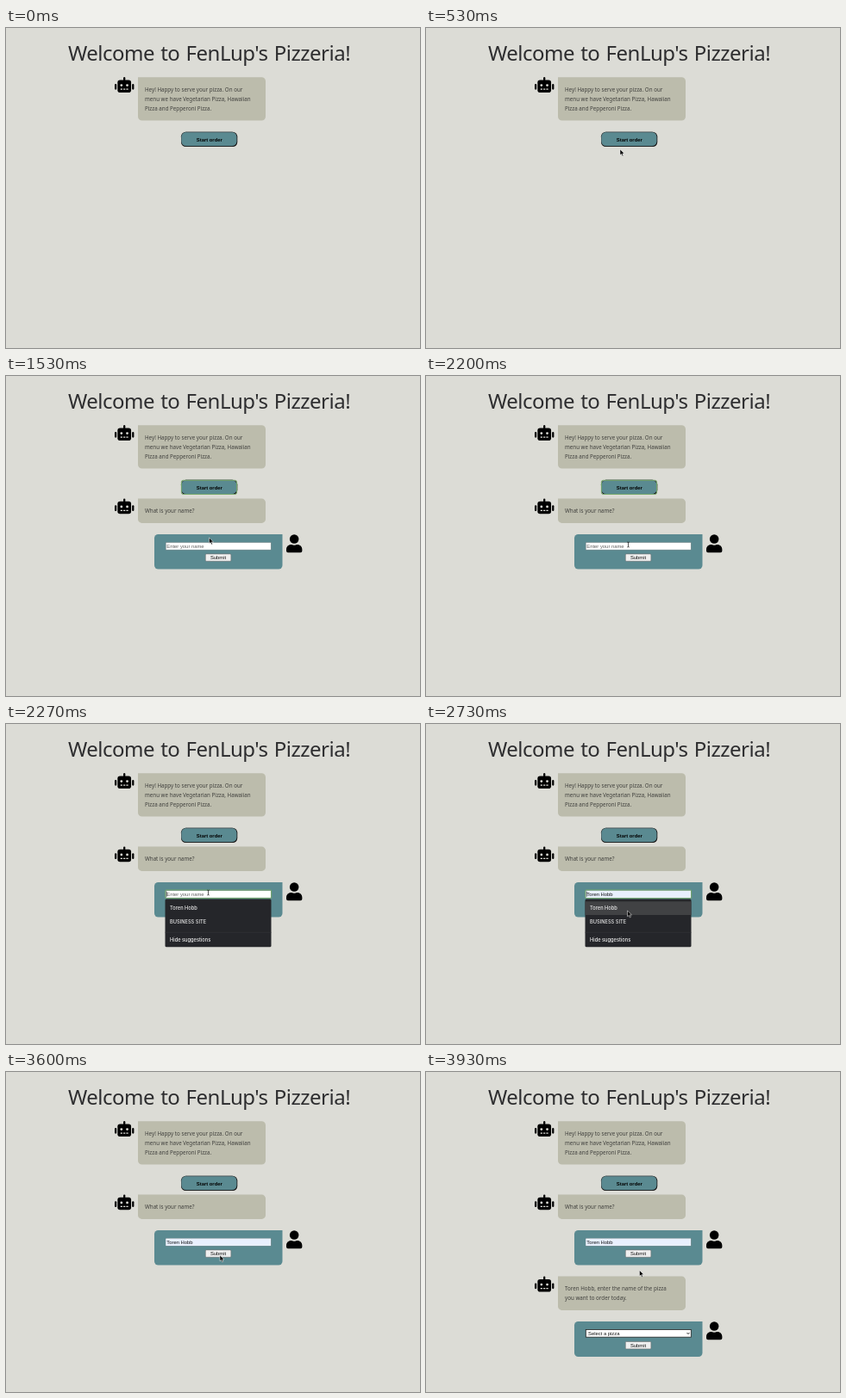
Recreate the animation shown at these times as an HTML page. Size 480 by 372 pixels, loop 3990 ms.

```html
<!DOCTYPE html>
<html lang="en">
<head>
<meta charset="utf-8">
<title>Pizza order chat</title>
<style>
  html, body { margin: 0; width: 100%; height: 100%; overflow: hidden; background: #dcdcd6; }
  svg { display: block; width: 480px; height: 372px; }
  text { white-space: pre; }
  .title { font: 24px "Noto Sans", sans-serif; letter-spacing: -.5px; word-spacing: 1.5px; text-anchor: middle; fill: #2d2d2f; }
  .chat { font: 6.23px "Noto Sans", sans-serif; fill: #41413e; }
  .ui { font: 5.87px "Liberation Sans", Arial, sans-serif; fill: #111; }
  .mid { text-anchor: middle; }
  .bold { font-weight: bold; fill: #000; }
  .hint { fill: #606060; }
  .menu { font: 500 5.7px Inter, sans-serif; fill: #eee; }
  .bot { fill: #bcbcac; }
  .user { fill: #5a8a91; }
  .ring { fill: none; stroke: #74a86c; }
</style>
</head>
<body>
<svg viewBox="0 0 480 372">
  <defs>
    <g id="robot" transform="scale(.035)">
      <rect x="288" width="64" height="140" rx="32"/>
      <rect x="96" y="96" width="448" height="416" rx="80"/>
      <rect y="224" width="64" height="192" rx="30"/>
      <rect x="576" y="224" width="64" height="192" rx="30"/>
      <g fill="#dcdcd6">
        <circle cx="224" cy="272" r="40"/><circle cx="416" cy="272" r="40"/>
        <path d="M192 384h64v32h-64zM288 384h64v32h-64zM384 384h64v32h-64z"/>
      </g>
    </g>
    <g id="person" transform="scale(.041)">
      <circle cx="224" cy="128" r="128"/>
      <path d="M314 288h-17c-45 21-101 21-146 0h-17C60 288 0 348 0 422v42c0 26 22 48 48 48h352c26 0 48-22 48-48v-42c0-74-60-134-134-134z"/>
    </g>
    <g id="submit">
      <rect x="231.3" y=".3" width="29.6" height="8.4" rx="1" fill="#efefef" stroke="#6f6f6f" stroke-width=".6"/>
      <text class="ui mid" x="246" y="6.5">Submit</text>
    </g>
  </defs>

  <rect width="480" height="372" fill="#dcdcd6"/>
  <text class="title" x="235.5" y="38">Welcome to FenLup's Pizzeria!</text>

  <use href="#robot" x="126" y="57.1"/>
  <path class="bot" d="M153 57.2h143.5a4.5 4.5 0 0 1 4.5 4.5v41.3a4.5 4.5 0 0 1-4.5 4.5h-139a4.5 4.5 0 0 1-4.5-4.5z"/>
  <text class="chat" x="161" y="74">Hey! Happy to serve your pizza. On our</text>
  <text class="chat" x="161" y="85">menu we have Vegetarian Pizza, Hawaiian</text>
  <text class="chat" x="161" y="96">Pizza and Pepperoni Pizza.</text>

  <rect x="203" y="120.8" width="65.3" height="17.2" rx="5.5" fill="#111"/>
  <rect x="203" y="120.8" width="64.5" height="16.4" rx="5.5" fill="#4a5d61"/>
  <rect x="203.7" y="121.5" width="63.6" height="15.5" rx="5" class="user"/>
  <text class="ui mid bold" x="235.8" y="131.5">Start order</text>
  <rect class="ring" data-on="930" data-off="2270" x="203.4" y="121.3" width="64.2" height="16.2" rx="2"/>

  <g data-on="1070">
    <use href="#robot" x="126" y="142.4"/>
    <path class="bot" d="M153 142.6h143.5a4.5 4.5 0 0 1 4.5 4.5v19.3a4.5 4.5 0 0 1-4.5 4.5h-139a4.5 4.5 0 0 1-4.5-4.5z"/>
    <text class="chat" x="161" y="159.3">What is your name?</text>

    <use href="#person" x="325" y="184.2"/>
    <path class="user" d="M320.5 184h-144a4.5 4.5 0 0 0-4.5 4.5v31.5a4.5 4.5 0 0 0 4.5 4.5h139.5a4.5 4.5 0 0 0 4.5-4.5z"/>
    <rect x="185.2" y="193.5" width="122" height="8.6" fill="#fff" stroke="#697a7d" stroke-width=".5"/>
    <text class="ui hint" data-off="2600" x="186.3" y="199.8">Enter your name</text>
    <g data-on="2600">
      <rect x="185.4" y="193.7" width="121.6" height="8.2" fill="#e8f0fe"/>
      <text class="ui" x="186.3" y="199.8">Toren Hobb</text>
    </g>
    <g data-on="2270" data-off="3600">
      <rect class="ring" x="184.8" y="193" width="122.8" height="9.6" rx=".8"/>
      <path d="M186.3 194.7v6" stroke="#111" stroke-width=".6"/>
    </g>
    <use href="#submit" y="206.6"/>
  </g>

  <g data-on="2270" data-off="3000">
    <rect x="184.5" y="203.5" width="123" height="55.8" rx="1.5" fill="#25262a"/>
    <rect data-on="2600" x="184.5" y="206.3" width="123" height="15.7" fill="#414244"/>
    <path d="M184.5 242.3h123" stroke="#35363a" stroke-width=".6"/>
    <text class="menu" x="190" y="216.3">Toren Hobb</text>
    <text class="menu" x="190" y="232">BUSINESS SITE</text>
    <text class="menu" x="190" y="252.7">Hide suggestions</text>
  </g>

  <g data-on="3730">
    <use href="#robot" x="126" y="237.6"/>
    <path class="bot" d="M153 237.6h143.5a4.5 4.5 0 0 1 4.5 4.5v30.3a4.5 4.5 0 0 1-4.5 4.5h-139a4.5 4.5 0 0 1-4.5-4.5z"/>
    <text class="chat" x="161" y="254.2">Toren Hobb, enter the name of the pizza</text>
    <text class="chat" x="161" y="265.2">you want to order today.</text>

    <use href="#person" x="325" y="290.2"/>
    <path class="user" d="M320.5 290h-144a4.5 4.5 0 0 0-4.5 4.5v32a4.5 4.5 0 0 0 4.5 4.5h139.500a4.5 4.5 0 0 0 4.5-4.5z"/>
    <rect x="185.3" y="299.5" width="122" height="8.7" fill="#fff" stroke="#222" stroke-width=".8"/>
    <text class="ui" x="188" y="305.9">Select a pizza</text>
    <path d="M302.5 303l1.5 1.6 1.5-1.6" fill="none" stroke="#111" stroke-width=".9"/>
    <use href="#submit" y="313.2"/>
  </g>

  <g id="cursor">
    <path id="arrow" d="M0 0v6.8l1.6-1.4 1.1 2.5 1.2-.5-1.1-2.5h2.2z" fill="#000" stroke="#fff" stroke-width=".5"/>
    <path id="beam" d="M-1.2-3q1.2 0 1.2 .8q0-.8 1.2-.8M0-2.2v4.4M-1.2 3q1.2 0 1.2-.8q0 .8 1.2 .8" fill="none" stroke="#111" stroke-width=".7"/>
  </g>
</svg>
<script>
  const LOOP = 3990, TICK = 200 / 3;
  // Cursor stops: time, x, y
  const path = [
    [270, 77, 229], [530, 225, 141], [600, 225, 141], [730, 232.5, 131.5],
    [1200, 232.5, 131.5], [1530, 235.5, 188], [1730, 234.5, 197], [1930, 234.5, 196],
    [2470, 234.5, 196], [2730, 233.5, 217], [3200, 233.5, 217], [3600, 248, 213],
    [3870, 248, 213], [3930, 247.5, 230.5]
  ];
  const [cursor, arrow, beam] = ['cursor', 'arrow', 'beam'].map(id => document.getElementById(id));
  const timed = [...document.querySelectorAll('[data-on], [data-off]')];
  const show = (el, on) => el.style.display = on ? '' : 'none';

  function cursorAt(t) {
    const i = path.findIndex(p => p[0] >= t);
    if (i < 1) return path[0].slice(1);
    const [t0, x0, y0] = path[i - 1], [t1, x1, y1] = path[i];
    const u = (t - t0) / (t1 - t0), e = u * u * (3 - 2 * u);
    return [x0 + (x1 - x0) * e, y0 + (y1 - y0) * e];
  }

  function draw(now) {
    // The picture advances 15 times a second, rounded to 10 ms
    const step = Math.floor((now % LOOP + 3.5) / TICK);
    const t = Math.round(step * TICK / 10) * 10;
    for (const el of timed) {
      const { on = 0, off = LOOP } = el.dataset;
      show(el, t >= on && t < off);
    }
    const [x, y] = cursorAt(t);
    const overInput = t > 1070 && y > 193 && y < 203;
    cursor.setAttribute('transform', `translate(${x} ${y})`);
    show(cursor, t >= path[0][0]);
    show(arrow, !overInput);
    show(beam, overInput);
  }

  const start = performance.now();
  function frame() {
    draw(performance.now() - start);
    requestAnimationFrame(frame);
  }
  frame();
</script>
</body>
</html>
```
